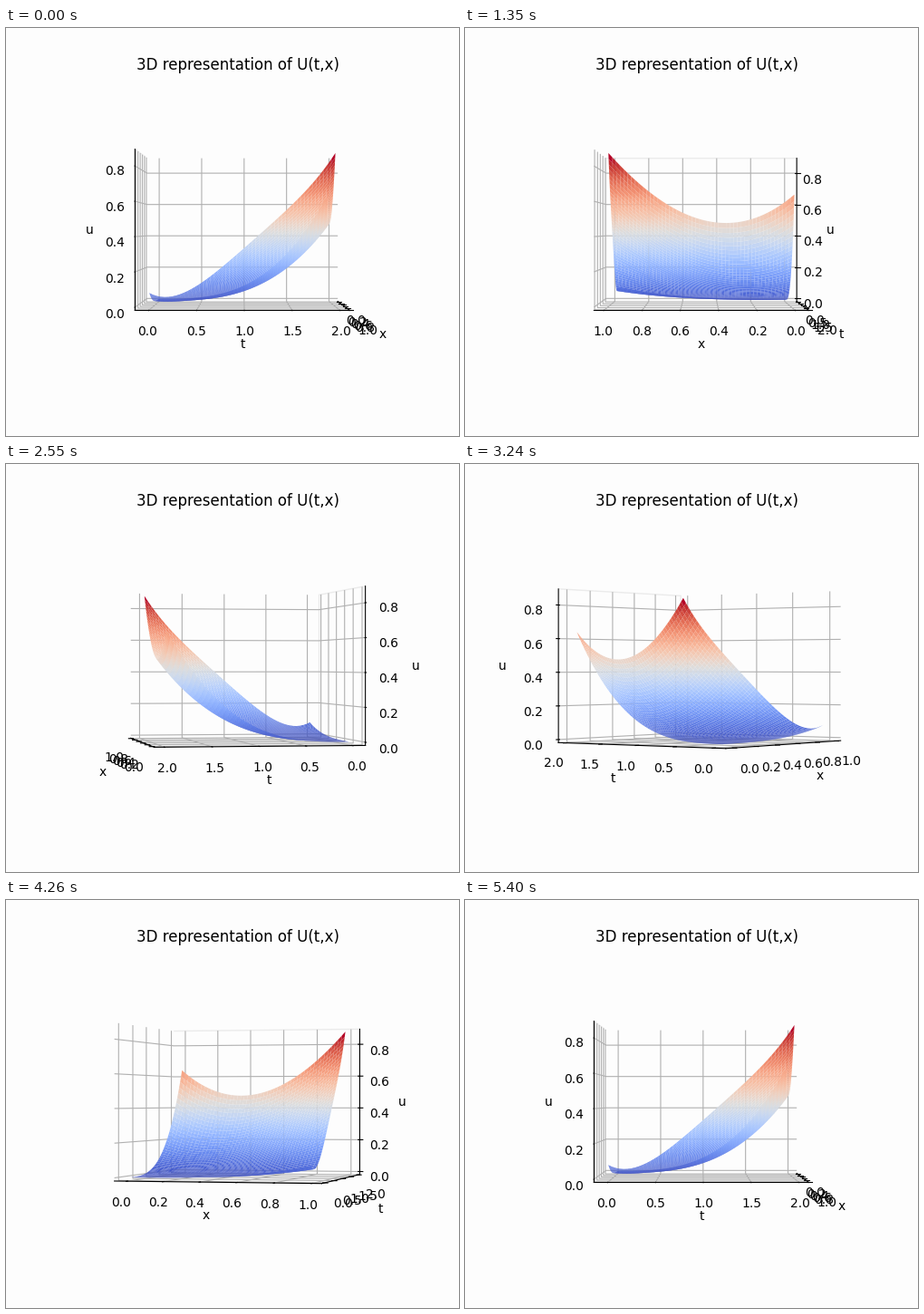
A matplotlib script for the animation above (5430 ms loop, 500 px wide and 450 px high).

```python
import matplotlib.pyplot as plt
import numpy as np
from matplotlib.animation import FuncAnimation

FRAMES, INTERVAL, STEP = 181, 30, 2
N = 50
PAPER = "#fdfdfd"


def surface(x, t):
    """Polynomial U(t,x), cubic in x with coefficients that depend on t."""
    a = 0.08 * t**3
    b = t * (0.01 - 0.233 * t)
    c = t * (-0.154 + 1.203 * t - 0.642 * t**2 + 0.124 * t**3)
    d = 0.077 - 0.14 * t
    return a + b * x + c * x**2 + d * x**3


def padded(v, margin):
    """Limits of v widened by a data margin and the 3D view margin."""
    lo, hi = v.min(), v.max()
    pad = (hi - lo) * margin
    lo, hi = lo - pad, hi + pad
    edge = (hi - lo) / 48
    return lo - edge, hi + edge


fig = plt.figure(figsize=(5, 4.5), dpi=100, facecolor=PAPER)
ax = fig.add_subplot(projection="3d", facecolor=PAPER)

# The grid stops one step short of x = 1 and t = 2.
steps = np.arange(N) / N
x, t = np.meshgrid(steps, 2 * steps)
u = surface(x / steps[-1], t / steps[-1])
ax.plot_surface(x, t, u, cmap="coolwarm", linewidth=0, antialiased=True)

ax.set_xlim(padded(x, 0.05))
ax.set_ylim(padded(t, 0.05))
ax.set_zlim(padded(u, 0))
ax.set(xlabel="x", ylabel="t", zlabel="u")
ax.set_title("3D representation of U(t,x)")

for axis in (ax.xaxis, ax.yaxis, ax.zaxis):
    axis.set_pane_color(PAPER)
ax.yaxis.pane.set_edgecolor("#ebebeb")


def turn(i):
    azim = STEP * i % 360
    # A tiny tilt keeps the choice of back walls stable at right angles.
    nudge = 1e-3 if azim < 180 else -1e-3
    ax.view_init(elev=1e-3, azim=azim + nudge)
    return []


anim = FuncAnimation(fig, turn, frames=FRAMES, interval=INTERVAL, repeat=True)
plt.show()
```
